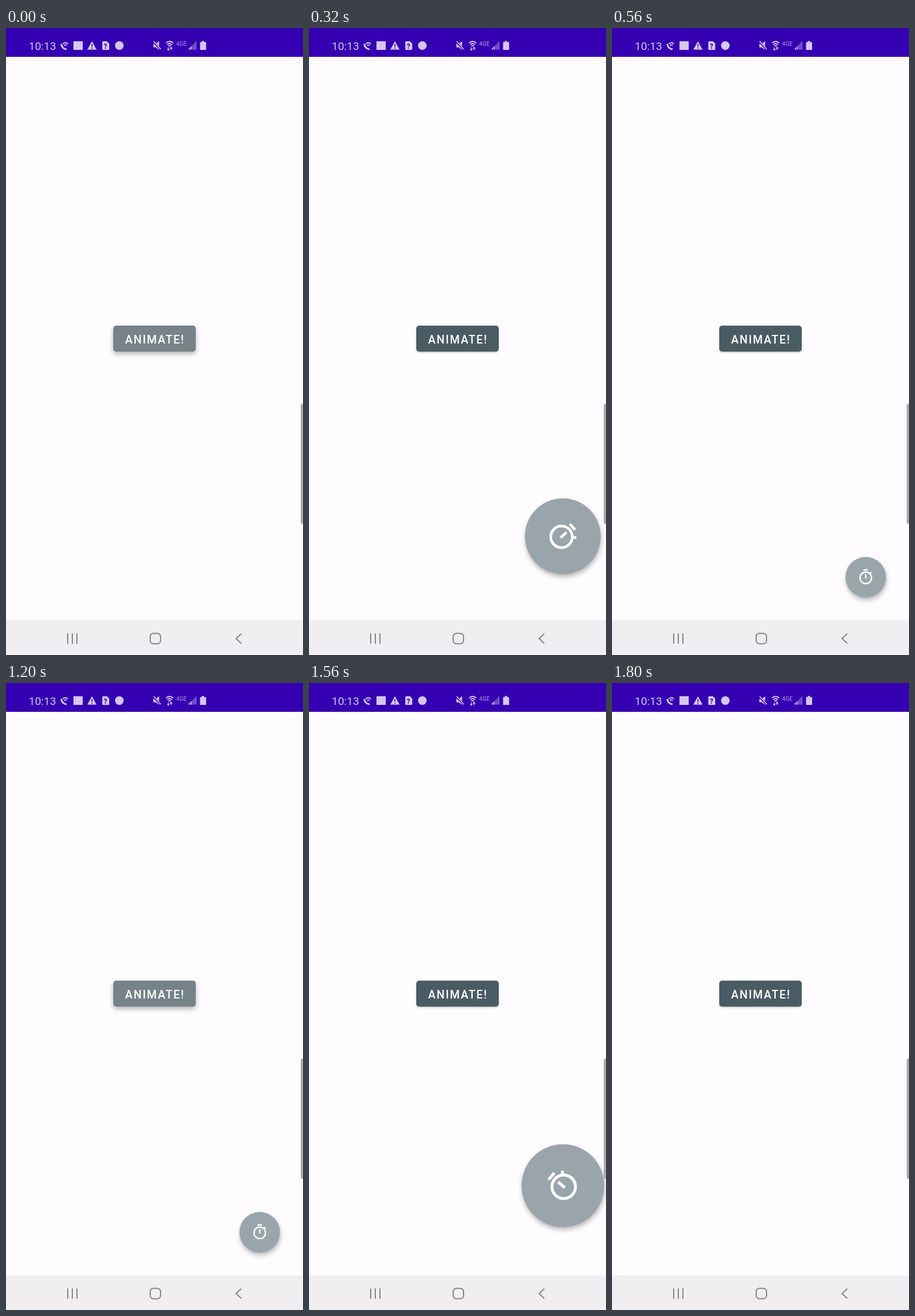
An HTML page for the animation above (1840 ms loop, 515 px wide and 1087 px high).

```html
<!DOCTYPE html>
<html lang="en">
<head>
<meta charset="utf-8">
<title>Bouncing action button</title>
<style>
  html, body { margin: 0; width: 100%; height: 100%; overflow: hidden; }
  body { position: relative; background: #fefcff; }
  svg { display: block; }
  .bar { position: absolute; left: 0; width: 515px; }
  #status { top: 0; height: 49.5px; background: #3500b1; }
  #nav { top: 1027px; height: 60px; background: #f0eef1; }
  #button {
    position: absolute; left: 186px; top: 515.5px; width: 143px; height: 45.5px;
    border-radius: 5px;
  }
  #fab {
    position: absolute; left: 440px; border-radius: 50%; background: #9aa5ab;
    box-shadow: 1px 5px 8px rgba(0, 0, 0, .27), 0 1px 3px rgba(0, 0, 0, .1);
    transform: translate(-50%, -50%);
  }
  #icon { position: absolute; left: 50%; top: 50%; width: 30px; height: 30px; margin: -15px; }
  #handle {
    position: absolute; left: 510.5px; top: 651px; width: 4.5px; height: 209px;
    border-radius: 4px 0 0 4px; background: #ababab;
  }
  text { font-family: Roboto, Arial, sans-serif; }
</style>
</head>
<body>
<div id="button">
  <svg width="143" height="45.5">
    <text x="20.6" y="30.5" font-size="19.5" font-weight="500" letter-spacing="1.74" fill="#fff">ANIMATE!</text>
  </svg>
</div>

<div id="fab">
  <svg id="icon" viewBox="0 0 24 24" fill="none" stroke="#fff" stroke-width="2">
    <circle cx="12" cy="13" r="8"/>
    <path d="M9 2h6M12 8v6M17.9 7.1l1.9-1.9"/>
  </svg>
</div>

<div id="handle"></div>

<div class="bar" id="status">
  <svg width="515" height="49" fill="#d3c7ef" stroke="none">
    <text x="39.5" y="38" font-size="19">10:13</text>
    <!-- call over wireless -->
    <g fill="none" stroke="#d3c7ef" stroke-width="1.7">
      <path d="M96 27.5c0 5 4 9 9 9.500" stroke-width="3"/>
      <path d="M98.500 27.500q4.500-4 9 0M100.500 30.500q2.500-2.500 5 0"/>
    </g>
    <rect x="117" y="23" width="16" height="15"/>
    <path d="M149 23l8 14.500h-16z"/>
    <path d="M148.200 28h1.700v4.500h-1.700zM148.200 34h1.700v1.700h-1.700z" fill="#3500b1"/>
    <path d="M168.500 23h6.500l4 4v9.500a1.500 1.500 0 0 1-1.500 1.500h-9a1.500 1.500 0 0 1-1.500-1.500v-12a1.500 1.500 0 0 1 1.500-1.500z"/>
    <text x="169.400" y="35.500" font-size="12" font-weight="700" fill="#3500b1">?</text>
    <circle cx="196.500" cy="30.500" r="7.500"/>
    <!-- muted speaker -->
    <path d="M255.500 27.500h4l6-4.500v15l-6-4.500h-4z"/>
    <path d="M255 23l14 15" stroke="#3500b1" stroke-width="3.500"/>
    <path d="M256 23l12.500 14" stroke="#d3c7ef" stroke-width="1.600"/>
    <!-- wireless with arrows -->
    <g fill="none" stroke="#d3c7ef" stroke-width="1.700">
      <path d="M277.500 26q6.300-5.500 12.600 0M279.500 29q4.300-4 8.600 0M281.500 31.500q2.300-2 4.600 0"/>
      <path d="M281.500 33.500v5M279.500 36.500l2 2 2-2M286.300 38.500v-5M284.300 35.500l2-2 2 2" stroke-width="1.300"/>
    </g>
    <text x="295" y="31" font-size="10" font-weight="500" opacity=".6">4GE</text>
    <path d="M317 34.500h2v3h-2zM320 32h2v5.500h-2z"/>
    <path d="M323 29.500h1.800v8h-1.800zM325.600 26.500h1.800v11h-1.800zM328.200 23.500h1.800v14h-1.800z" opacity=".55"/>
    <path d="M339.500 22.500h4v2h3.500v13.500h-10.500v-13.500h3z"/>
  </svg>
</div>

<div class="bar" id="nav">
  <svg width="515" height="60" fill="none" stroke="#858388" stroke-width="2">
    <path d="M107 22.500v18M115 22.500v18M123 22.500v18"/>
    <rect x="250" y="22.500" width="18" height="18" rx="5.500"/>
    <path d="M408 23l-9 8.500 9 8.500"/>
  </svg>
</div>

<script>
  const LOOP = 1840, STEP = 40, SIZE = 70, REST = 952;
  // start and length in ms; each property: [distance, tension]
  const ENTER = { at: 29, ms: 480, grow: [1, 9.9], slide: [166.5, 5.2], turn: [829, 1.266] };
  const LEAVE = { at: 1377.6, ms: 400, grow: [1, 10], slide: [171, 5], turn: [720, 1.45] };

  const button = document.getElementById('button');
  const fab = document.getElementById('fab');
  const icon = document.getElementById('icon');

  const clamp = x => Math.min(1, Math.max(0, x));
  const mix = (a, b, k) => a + (b - a) * k;
  const anticipate = (x, tension) => x * x * ((tension + 1) * x - tension);

  function drawFab(t) {
    const entering = t < LEAVE.at;
    const phase = entering ? ENTER : LEAVE;
    const p = clamp((t - phase.at) / phase.ms);
    // how far away from rest; negative means past it
    const away = ([dist, tension]) => dist * anticipate(entering ? 1 - p : p, tension);
    const scale = Math.max(0, 1 - away(phase.grow));
    const turn = away(phase.turn) * (entering ? -1 : 1);
    fab.style.display = scale > 0.001 ? 'block' : 'none';
    fab.style.width = fab.style.height = SIZE * scale + 'px';
    fab.style.top = REST + away(phase.slide) + 'px';
    icon.style.transform = `rotate(${turn}deg) scale(${scale})`;
  }

  function drawButton(t) {
    const press = t < 1200 ? 1 - clamp((t - 20) / 120) : 1 - clamp((t - 1360) / 130);
    const rgb = [[74, 92, 99], [118, 131, 137]];
    const color = rgb[0].map((c, i) => Math.round(mix(c, rgb[1][i], press)));
    button.style.background = `rgb(${color})`;
    button.style.boxShadow =
      `0 ${mix(1.5, 4, press)}px ${mix(3, 8, press)}px rgba(0, 0, 0, ${mix(.25, .3, press)})`;
  }

  const start = performance.now();
  function frame() {
    const t = Math.floor(((performance.now() - start) % LOOP) / STEP) * STEP;
    drawFab(t);
    drawButton(t);
    requestAnimationFrame(frame);
  }
  frame();
</script>
</body>
</html>
```
